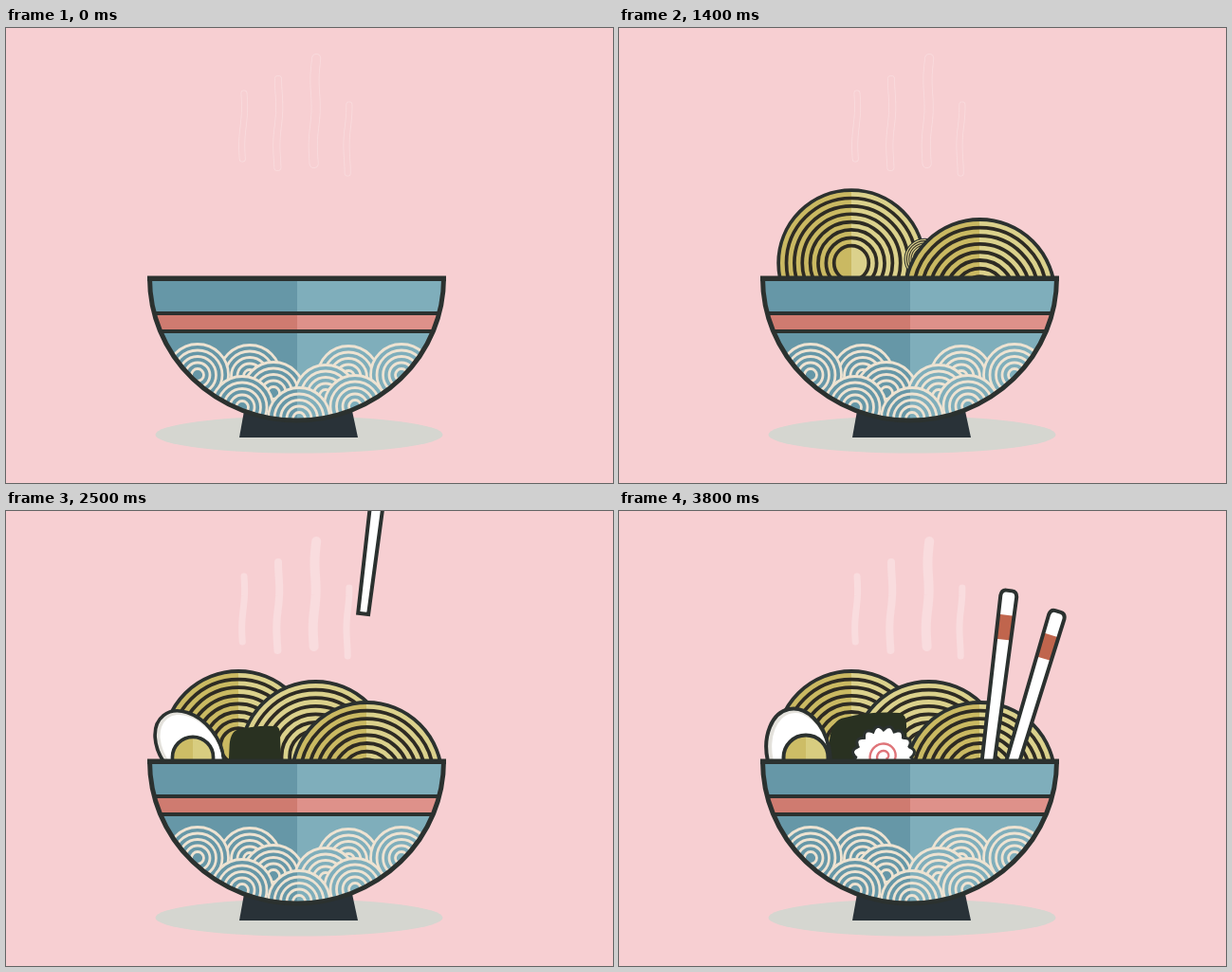
An HTML page with a canvas that plays this animation: 640x480 px, repeating every 3.9 s.

```html
<!DOCTYPE html>
<html lang="en">
<head>
<meta charset="utf-8">
<title>Noodle bowl</title>
<style>
  html, body { margin: 0; width: 100%; height: 100%; overflow: hidden; background: #f7cfd2; }
  canvas { display: block; }
</style>
</head>
<body>
<canvas id="stage" width="640" height="480"></canvas>
<script>
const ctx = document.getElementById('stage').getContext('2d');
const LOOP = 3900, STEP = 100, TAU = Math.PI * 2, RIM = 264;
const PINK = '#f7cfd2', DARK = '#2b312f', BROTH = '#2e2b23', CREAM = '#eee3d2';

const progress = (t, start, length) => Math.min(1, Math.max(0, (t - start) / length));
const easeOut = u => 1 - (1 - u) ** 3;

// Two flat tones meeting at a vertical line.
function split(x, left, right) {
  const g = ctx.createLinearGradient(x - 1, 0, x + 1, 0);
  g.addColorStop(0.5, left);
  g.addColorStop(0.5, right);
  return g;
}

const BLUE = split(307, '#6697a7', '#7faebb');
const RED = split(307, '#cf7b70', '#de918a');
const PALE = '#dbd18c';
const STRAW = split(0, '#cab962', PALE);

function paint(fill, stroke, width) {
  if (fill) { ctx.fillStyle = fill; ctx.fill(); }
  if (stroke) { ctx.strokeStyle = stroke; ctx.lineWidth = width; ctx.stroke(); }
}

function oval(x, y, rx, ry, fill, stroke, width, tilt = 0) {
  ctx.beginPath();
  ctx.ellipse(x, y, rx, ry, tilt, 0, TAU);
  paint(fill, stroke, width);
}

const circle = (x, y, r, fill, stroke, width) => oval(x, y, r, r, fill, stroke, width);

function line(x1, y1, x2, y2, color, width) {
  ctx.beginPath();
  ctx.moveTo(x1, y1);
  ctx.lineTo(x2, y2);
  paint(null, color, width);
}

function placed(x, y, scale, angle, draw) {
  if (scale <= 0) return;
  ctx.save();
  ctx.translate(x, y);
  ctx.rotate(angle);
  ctx.scale(scale, scale);
  draw();
  ctx.restore();
}

function steam(t) {
  const shown = progress(t, 1800, 300);
  const wisps = [[251, 69, 140, 7], [288, 54, 148, 8], [327, 32, 144, 10], [361, 81, 155, 7]];
  ctx.lineCap = 'round';
  for (const [x, top, bottom, width] of wisps) {
    ctx.beginPath();
    for (let y = top; y <= bottom; y += 3) {
      ctx.lineTo(x - (y - top) * .025 + Math.sin(y / 11), y);
    }
    paint(null, '#f9dcde', width);
    ctx.globalAlpha = 1 - shown;
    paint(null, PINK, width - 1.6);
    ctx.globalAlpha = 1;
  }
  ctx.lineCap = 'butt';
}

function noodles(x, y, scale, fill = STRAW, dx = 0, dy = 0) {
  placed(x, y, scale, 0, () => {
    for (let i = 0; i < 8; i++) circle(dx, dy, 79 - i * 8.6, i ? null : fill, i ? BROTH : DARK, 3.8);
  });
}

function egg(t) {
  const u = progress(t, 1935, 1000), turn = 60 * (1 - u);
  placed(197, 259, easeOut(u), 0, () => {
    const x = -8 + turn * .15, y = -3 - turn * .25, tilt = -(12 + turn) * Math.PI / 180;
    oval(x, y, 33, 48, '#e4e2dc', DARK, 4, tilt);
    oval(x + 2, y + .5, 29, 44, '#fff', null, 0, tilt);
    circle(0, 1, 23.5, split(0, '#cdbd66', '#d8cd80'), DARK, 4);
  });
}

function nori(t) {
  placed(262, 254, easeOut(progress(t, 2200, 1000)), 0, () => {
    ctx.beginPath();
    ctx.moveTo(-42, 30);
    ctx.lineTo(-40, -12);
    ctx.quadraticCurveTo(-38, -34, -24, -36);
    ctx.quadraticCurveTo(4, -43, 34, -41);
    ctx.quadraticCurveTo(41, -40, 41, -28);
    ctx.lineTo(43, 30);
    ctx.closePath();
    paint('#293121');
  });
}

function fishcake(t) {
  const u = progress(t, 2500, 800);
  placed(279, 260, easeOut(u), u - 1, () => {
    ctx.beginPath();
    for (let a = 0; a < TAU; a += .03) {
      const r = 29 + 4 * Math.abs(Math.sin(a * 8));
      ctx.lineTo(r * Math.cos(a), r * Math.sin(a));
    }
    ctx.closePath();
    paint('#fff', DARK, 3);
    ctx.beginPath();
    for (let a = 0; a < 11; a += .1) {
      const r = 16 - a * 1.2;
      ctx.lineTo(1 + r * Math.cos(2.6 + a), -1 + r * Math.sin(2.6 + a));
    }
    paint(null, '#df7479', 2.4);
  });
}

function chopstick(t, start, x, y, angle) {
  const u = progress(t, start, 600);
  if (!u) return;
  placed(x, y - 445 * (1 - u) ** 3, 1, angle, () => {
    ctx.beginPath();
    ctx.moveTo(-5.5, 284);
    ctx.lineTo(-8.5, 6);
    ctx.quadraticCurveTo(-8, 0, -3, 0);
    ctx.lineTo(3, 0);
    ctx.quadraticCurveTo(8, 0, 8.5, 6);
    ctx.lineTo(5.5, 284);
    ctx.closePath();
    paint('#fff');
    ctx.fillStyle = '#c0654d';
    ctx.fillRect(-8, 26, 16, 26);
    paint(null, DARK, 4);
  });
}

function bowl() {
  ctx.beginPath();
  ctx.moveTo(251, 404);
  ctx.lineTo(365, 404);
  ctx.lineTo(371, 432);
  ctx.lineTo(246, 432);
  paint('#293238');

  const shape = new Path2D();
  shape.ellipse(306.5, RIM, 155, 150, 0, 0, Math.PI);
  shape.closePath();
  ctx.save();
  ctx.clip(shape);
  ctx.fillStyle = BLUE;
  ctx.fillRect(140, 260, 340, 160);
  const waves = [[257, 367], [361, 368], [282, 385], [337, 388], [202, 366], [417, 366], [249, 400], [368, 399], [309, 412]];
  for (const [x, y] of waves) {
    for (let i = 5; i > 0; i--) circle(x, y, i * 6.5, BLUE, CREAM, 2.8);
  }
  ctx.fillStyle = RED;
  ctx.fillRect(140, 301, 340, 19);
  line(140, 301, 480, 301, DARK, 4);
  line(140, 320, 480, 320, DARK, 4);
  ctx.restore();

  ctx.strokeStyle = DARK;
  ctx.lineWidth = 5;
  ctx.stroke(shape);
  line(149, 264.5, 464, 264.5, DARK, 5);
}

function draw(t) {
  const grow = start => easeOut(progress(t, start, 1000));
  ctx.fillStyle = PINK;
  ctx.fillRect(0, 0, 640, 480);
  oval(309, 429, 151.5, 19.5, '#d5d6d0');
  steam(t);

  ctx.save();
  ctx.beginPath();
  ctx.rect(0, 0, 640, RIM);
  ctx.clip();
  noodles(245, 248, grow(700));
  noodles(321, 238, grow(1300), PALE, 5.5, 21);
  noodles(380.5, 281, grow(50));
  nori(t);
  egg(t);
  fishcake(t);
  chopstick(t, 2400, 411.5, 84, .123);
  chopstick(t, 3100, 463, 106, .293);
  ctx.restore();

  bowl();
}

function frame() {
  draw(Math.floor(performance.now() % LOOP / STEP) * STEP);
  requestAnimationFrame(frame);
}
frame();
</script>
</body>
</html>
```
